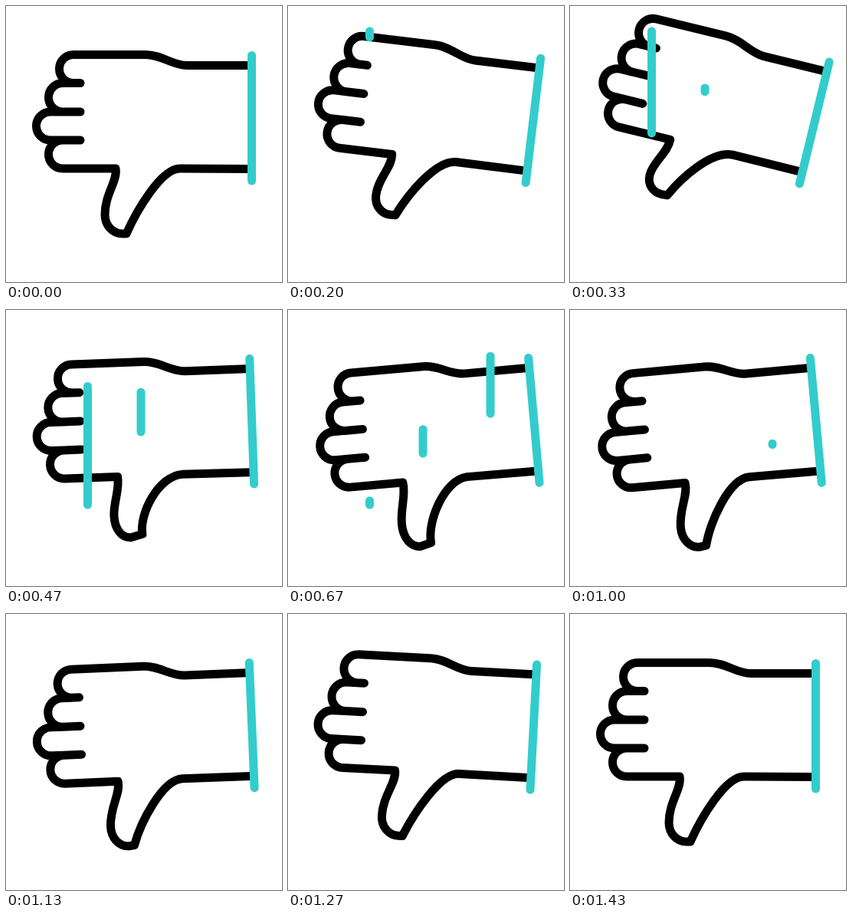
These frames come from a looping animation (360 px wide and 360 px high, 1670 ms). An HTML page with a canvas:

```html
<!DOCTYPE html>
<html lang="en">
<head>
<meta charset="utf-8">
<title>Thumbs down</title>
<style>
  html, body { margin: 0; width: 100%; height: 100%; overflow: hidden; background: #fff; }
  canvas { display: block; width: 360px; height: 360px; }
</style>
</head>
<body>
<canvas id="stage" width="360" height="360"></canvas>
<script>
const ctx = document.getElementById('stage').getContext('2d');
const LOOP = 1670;
const BLACK = '#000';
const TEAL = '#33cccc';
const PIVOT = { x: 294, y: 142 };

// Thumb outlines: three cubic segments and one short line, as x, y pairs.
const REST = [146, 228, 129, 245, 129, 272, 129, 286, 139, 297, 152, 297, 157, 297, 170, 268, 202, 212, 227, 212];
const TUCKED = [144, 230, 128, 245, 128, 263, 128, 276, 137, 284, 149, 284, 156.5, 283.5, 168, 259, 198, 213, 227, 212];
const SWUNG = [146, 228, 142, 245, 142, 261.5, 142, 282, 150, 297, 163, 297, 183, 291, 170, 264, 194, 214, 227, 212];

const mix = (a, b, k) => a + (b - a) * k;
const mixShape = (a, b, k) => a.map((v, i) => mix(v, b[i], k));
const ease = (from, to, step) => {
  const k = Math.min(1, Math.max(0, (step - from) / (to - from)));
  return k * k * (3 - 2 * k);
};

const NUDGED = mixShape(REST, SWUNG, 0.25);
const POSES = [
  { at: 2, angle: 0, thumb: REST },
  { at: 10, angle: 13.7, thumb: TUCKED },
  { at: 17, angle: -12.3, thumb: SWUNG },
  { at: 24, angle: 6.1, thumb: REST },
  { at: 31, angle: -5.9, thumb: NUDGED },
  { at: 38, angle: 3, thumb: REST },
  { at: 43, angle: 0, thumb: REST }
];

const STREAKS = [
  { x: 106.5, top: 33, bottom: 254, delay: 0 },
  { x: 176, top: 107, bottom: 187, delay: 3.7 },
  { x: 264, top: 60, bottom: 175.5, delay: 9.7 }
];

function poseAt(step) {
  let i = 0;
  while (i < POSES.length - 2 && step > POSES[i + 1].at) i++;
  const a = POSES[i], b = POSES[i + 1];
  const k = ease(a.at, b.at, step);
  return { angle: mix(a.angle, b.angle, k), thumb: mixShape(a.thumb, b.thumb, k) };
}

function verticalLine(x, top, bottom) {
  ctx.strokeStyle = TEAL;
  ctx.lineCap = 'round';
  ctx.beginPath();
  ctx.moveTo(x, top);
  ctx.lineTo(x, bottom);
  ctx.stroke();
}

function finger(left, top, bottom) {
  const r = (bottom - top) / 2;
  ctx.arc(left + r, top + r, r, -Math.PI / 2, Math.PI / 2, true);
}

function drawHand({ angle, thumb: t }) {
  ctx.save();
  ctx.translate(PIVOT.x, PIVOT.y);
  ctx.rotate(angle * Math.PI / 180);
  ctx.translate(-PIVOT.x, -PIVOT.y);

  ctx.strokeStyle = BLACK;
  ctx.lineCap = 'round';
  ctx.beginPath();
  ctx.moveTo(316, 77.5);
  ctx.lineTo(236, 77.5);
  ctx.bezierCurveTo(217, 77.5, 203, 63.5, 182, 63.5);
  finger(69.5, 63.5, 100.5);
  finger(55.5, 100.5, 138);
  finger(39.5, 138, 175);
  finger(55.5, 175, 212);
  ctx.lineTo(143, 212);
  ctx.bezierCurveTo(...t.slice(0, 6));
  ctx.bezierCurveTo(...t.slice(6, 12));
  ctx.lineTo(t[12], t[13]);
  ctx.bezierCurveTo(...t.slice(14, 20));
  ctx.lineTo(316, 212.5);
  for (const y of [100.5, 138, 175]) {
    ctx.moveTo(74, y);
    ctx.lineTo(97, y);
  }
  ctx.stroke();

  verticalLine(320.5, 64.5, 228);
  ctx.restore();
}

function drawStreak({ x, top, bottom, delay }, step) {
  const head = ease(5, 13.8, step - delay);
  const tail = ease(10, 21, step - delay);
  if (head > 0 && tail < 1) verticalLine(x, mix(top, bottom, tail), mix(top, bottom, head));
}

// 30 steps per second, each starting on a multiple of 10 ms.
function stepAt(ms) {
  const n = Math.round(ms * 0.03);
  return Math.round(n * 10 / 3) * 10 > ms ? n - 1 : n;
}

function render() {
  const step = stepAt(performance.now() % LOOP);
  ctx.fillStyle = '#fff';
  ctx.fillRect(0, 0, 360, 360);
  ctx.lineWidth = 11;
  ctx.lineJoin = 'round';
  drawHand(poseAt(step));
  STREAKS.forEach(s => drawStreak(s, step));
  requestAnimationFrame(render);
}
render();
</script>
</body>
</html>
```
